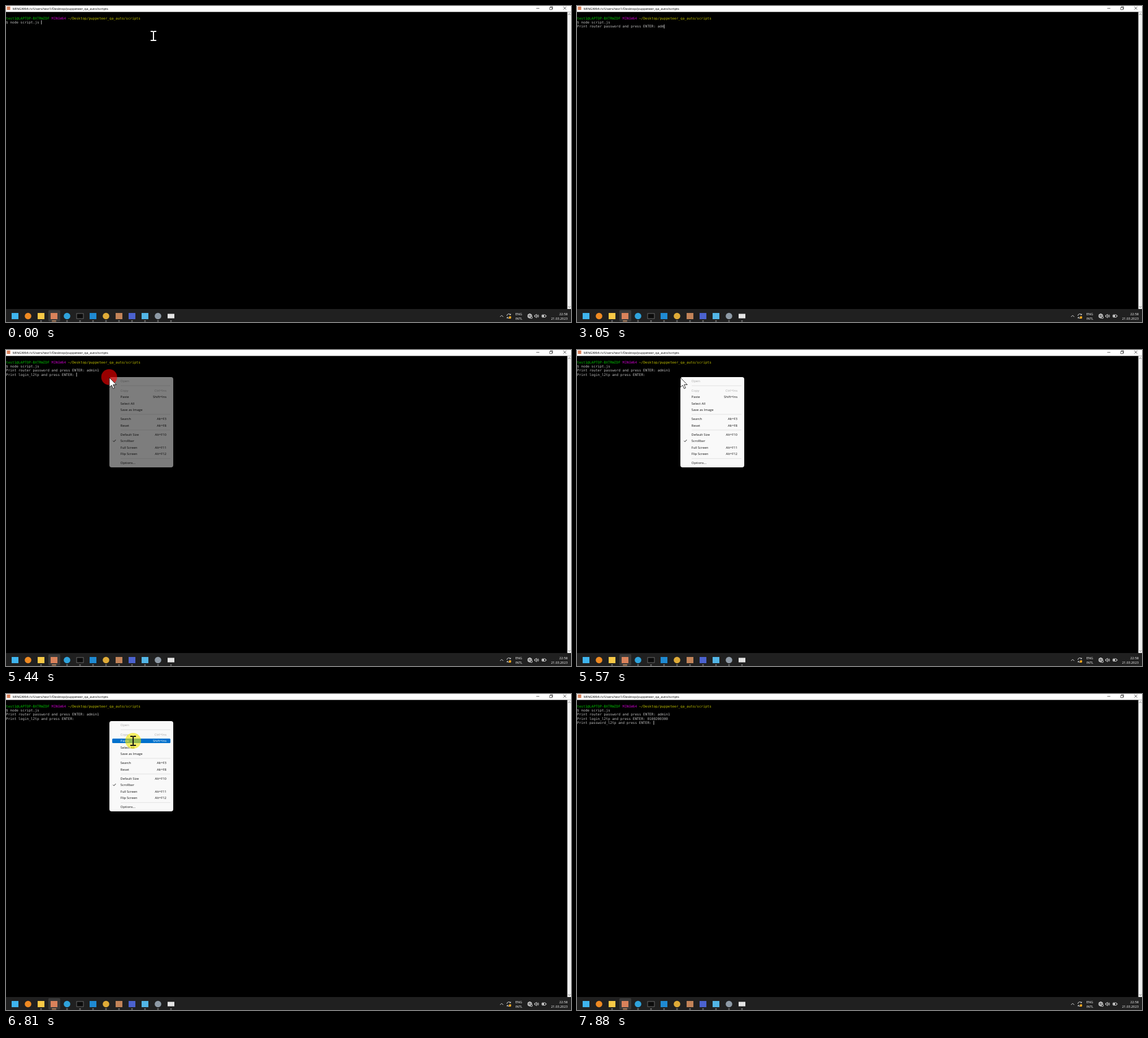
An HTML page for the animation above (8 s loop, 1000 px wide and 560 px high).

```html
<!DOCTYPE html>
<html lang="en">
<head>
<meta charset="utf-8">
<title>Terminal session</title>
<style>
  html, body { margin: 0; width: 100%; height: 100%; overflow: hidden; background: #000; }
  svg { display: block; width: 100vw; height: 100vh; }
  text { white-space: pre; }
  .ui { font: 5.92px "Open Sans", "Noto Sans", sans-serif; }
  .term { font: 6.08px "DejaVu Sans Mono", monospace; fill: #bfbfbf; }
  .end { text-anchor: end; }
  .line { fill: none; stroke: #fff; stroke-width: .8; }
</style>
</head>
<body>
<svg viewBox="0 0 1000 560">
  <rect width="1000" height="560"/>

  <g id="titlebar">
    <rect width="1000" height="10.5" fill="#fff"/>
    <rect x="1.5" y="1" width="6" height="6" fill="#d9825b"/>
    <text class="ui" x="11.7" y="6.9">MINGW64:/c/Users/test1/Desktop/puppeteer_qa_auto/scripts</text>
    <path d="M938.5 4.2h5.5M986.5 1.4l5 5m0-5l-5 5M962.3 2.6h4v4h-4zM963.5 2.4v-1h4v4h-1"
          fill="none" stroke="#222" stroke-width=".7"/>
  </g>

  <g id="scrollbar">
    <rect x="993.5" y="10.5" width="6.5" height="527" fill="#f0f0f0"/>
    <path d="M995 16l2-2.5 2 2.5M995 532l2 2.5 2-2.5" fill="none" stroke="#777" stroke-width=".8"/>
  </g>

  <g id="terminal" class="term">
    <text y="23.6" fill="#00bf00">test1@LAPTOP-BXTRWZDF <tspan fill="#bf00bf">MINGW64</tspan> <tspan fill="#bfbf00">~/Desktop/puppeteer_qa_auto/scripts</tspan></text>
    <text y="31">$ node script.js</text>
    <text y="38.3" id="router"></text>
    <text y="45.7" id="login"></text>
    <text y="53" id="password"></text>
    <rect id="caret" width="1" height="7.2"/>
  </g>

  <g id="taskbar">
    <rect y="537" width="1000" height="23" fill="#202020"/>
    <rect x="75" y="539" width="21" height="20" rx="2" fill="#393939"/>
    <g id="apps"></g>
    <path class="line" d="M874.5 551l2.8-2.8 2.8 2.8"/>
    <path class="line" d="M886.5 549a3.6 3.6 0 0 1 6.6-1.8v-1.8m0 1.8h-2M893.5 550a3.6 3.6 0 0 1-6.6 1.8v1.8m0-1.8h2"/>
    <circle cx="892" cy="552" r="2.2" fill="#f7a51c"/>
    <g class="ui" fill="#fff">
      <text x="901.5" y="548">ENG</text>
      <text x="901.5" y="556.4">INTL</text>
      <g class="end" style="font-size:5.75px">
        <text x="994" y="547.8">22:58</text>
        <text x="994" y="556.2">21.03.2023</text>
      </g>
    </g>
    <g class="line" stroke-width=".7">
      <circle cx="927" cy="549.3" r="3.7"/>
      <ellipse cx="927" cy="549.3" rx="1.6" ry="3.7"/>
      <path d="M923.5 548h7m-7 2.6h7"/>
      <circle cx="929.8" cy="552" r="1.8" fill="#202020"/>
      <path d="M935.5 548.2h1.4l2-2v6.4l-2-2h-1.4zM940.3 548q1 1.4 0 2.8M941.6 546.8q2 2.6 0 5.2"/>
      <rect x="948.5" y="547.2" width="6.5" height="4.4" rx="1"/>
      <path d="M956.2 548.5v1.8"/>
    </g>
    <rect x="949.4" y="548.1" width="2.6" height="2.6" fill="#fff"/>
  </g>

  <g id="menu" class="ui">
    <rect x="183" y="48" width="113" height="160" rx="4" fill="#f9f9f9"/>
    <path d="M203 63.3h88m-88 50.7h88m-88 27.8h88m-88 50.6h88" stroke="#d8d8d8" stroke-width=".7"/>
    <rect id="hover" x="188" width="103" height="8" rx="1.5" fill="#0070cc"/>
    <path d="M189.3 160.8l1.8 1.8 3.2-3.6" fill="none" stroke="#111" stroke-width=".9"/>
    <g id="items"></g>
  </g>

  <circle id="click" r="14"/>
  <path id="beam" fill="none" stroke-width="2"
        d="M-5-8h3.5L0-7l1.5-1H5M0-7V7M-5 8h3.5L0 7l1.5 1H5"/>
  <path id="arrow" fill="#fff" stroke="#000" stroke-width=".8"
        d="M0 0v17l4-3.6 2.6 6 2.6-1.1-2.6-5.8h5.6z"/>
</svg>

<script>
const LOOP = 8000, CELL = 3.66, ROW_TOP = 18, ROW = 7.35;
const $ = id => document.getElementById(id);

function add(parent, tag, attrs, text = '') {
  const el = document.createElementNS('http://www.w3.org/2000/svg', tag);
  for (const key in attrs) el.setAttribute(key, attrs[key]);
  el.textContent = text;
  $(parent).append(el);
  return el;
}
function set(id, attrs) {
  for (const key in attrs) $(id).setAttribute(key, attrs[key]);
}

// Taskbar: one plain shape per app, with a mark under those that run.
const apps = [
  ['square', '#3fb4ee'], ['circle', '#ef8a22'], ['square', '#f8c846'], ['square', '#d9825b'],
  ['circle', '#2fa3dc'], ['square', '#0c0c0c'], ['square', '#1f8ad2'], ['circle', '#dfab37'],
  ['square', '#c28358'], ['square', '#4b62cf'], ['square', '#52b5e6'], ['circle', '#8e9aa6'],
  ['square', '#e4e4e4']
];
apps.forEach(([shape, fill], i) => {
  const x = 16 + 23 * i, y = 549.5;
  if (shape === 'circle') add('apps', 'circle', { cx: x, cy: y, r: 5.8, fill });
  else {
    const h = i === 12 ? 8 : i === 5 ? 9 : 11;
    add('apps', 'rect', { x: x - 6, y: y - h / 2, width: 12, height: h, fill,
      stroke: i === 5 ? '#8a8a8a' : 'none', 'stroke-width': .7 });
  }
  if (i > 1) {
    const w = i === 3 ? 8 : 3;
    add('apps', 'rect', { x: x - w / 2, y: 557.6, width: w, height: 1.4, rx: .7,
      fill: i === 3 ? '#e0a070' : '#9a9a9a' });
  }
});

const items = [
  [55.3, 'Open', '', true], [71.5, 'Copy', 'Ctrl+Ins', true], [83, 'Paste', 'Shift+Ins'],
  [94.5, 'Select All', ''], [106, 'Save as Image', ''], [122, 'Search', 'Alt+F3'],
  [133.5, 'Reset', 'Alt+F8'], [149.7, 'Default Size', 'Alt+F10'], [161.2, 'Scrollbar', ''],
  [172.7, 'Full Screen', 'Alt+F11'], [184.2, 'Flip Screen', 'Alt+F12'], [200.3, 'Options...', '']
].map(([y, label, keys, disabled]) => ({
  y, disabled,
  parts: [
    add('items', 'text', { x: 202.6, y: y + 2.1 }, label),
    add('items', 'text', { x: 284, y: y + 2.1, class: 'end' }, keys)
  ]
}));

// Caret: time, row, column (no column while blinked off).
const caretTrack = [
  [0, 1, 17], [460, 2, 0], [1530], [1880, 2, 39], [2380],
  [2810, 2, 40], [2910, 2, 41], [3050, 2, 42], [3210, 2, 43], [3360, 2, 44], [3520, 2, 45],
  [3970, 3, 34], [4490], [5070, 3, 34], [5570], [6070, 3, 34], [6570],
  [6920, 3, 44], [7420], [7820, 4, 37]
];
const keyTimes = [2810, 2910, 3050, 3210, 3360, 3520];

// Index of the current step in a run of n steps from a to b; -1 before it.
const step = (t, a, b, n) =>
  t < a ? -1 : Math.min(n - 1, Math.floor((t - a) / (b - a) * (n - 1) + .1));
const part = (t, a, b, n) => Math.max(0, step(t, a, b, n)) / (n - 1);
const mix = (a, b, u) => a + (b - a) * u;
const between = (p, q, u) => [mix(p[0], q[0], u), mix(p[1], q[1], u)];
const easeOut = u => 1 - (1 - u) ** 1.6;

function pointerAt(t) {
  const corner = [183, 49], low = [219, 97], high = [227, 76], paste = [225, 83];
  if (t < 4490) return [261, 53];
  if (t < 5440) return between([256, 52], [183, 48.5], easeOut(part(t, 4490, 4870, 8)));
  if (t < 6430) {
    const u = part(t, 5730, 6180, 8);
    return u < .6 ? between(corner, low, u / .6) : between(low, high, (u - .6) / .4);
  }
  if (t < 6760) return between(high, paste, (step(t, 6430, 6600, 3) + 1) / 3);
  const k = step(t, 6760, 7160, 8);
  return between(paste, [260, 151], easeOut(Math.max(0, k - 1) / 6));
}

function pointerOpacity(t) {
  if (t < 4490) return 1 - (step(t, 460, 610, 3) + 1) / 3;
  return t < 7820 ? 1 : t < 7880 ? .4 : 0;
}

function drawTerminal(t) {
  const typed = 'admin1'.slice(0, keyTimes.filter(k => t >= k).length);
  $('router').textContent = t < 1880 ? '' : 'Print router password and press ENTER: ' + typed;
  $('login').textContent = t < 3970 ? '' :
    'Print login_l2tp and press ENTER: ' + (t < 6920 ? '' : '0100200300');
  $('password').textContent = t < 7820 ? '' : 'Print password_l2tp and press ENTER:';
  const [, row, col] = caretTrack.filter(c => t >= c[0]).pop();
  set('caret', col === undefined ? { opacity: 0 } :
    { opacity: 1, x: col * CELL, y: ROW_TOP + row * ROW });
}

function drawMenu(t, y) {
  const closing = step(t, 6760, 7160, 8);
  const opacity = closing < 0 ? part(t, 5320, 5570, 5) : [1, 1, .7, .35][closing] || 0;
  set('menu', { opacity });
  const active = t < 5730 ? null : t >= 6760 ? items[2] :
    items.find(i => !i.disabled && Math.abs(i.y - y) < 5.75);
  set('hover', active ? { opacity: 1, y: active.y - 4 } : { opacity: 0 });
  for (const item of items) {
    const fill = item === active ? '#fff' : item.disabled ? '#a8a8a8' : '#111';
    item.parts.forEach(el => el.setAttribute('fill', fill));
  }
}

function drawClick(t) {
  const right = step(t, 5320, 5570, 5), left = step(t, 6760, 7160, 8);
  if (left >= 0) set('click', { cx: 225, cy: 83, fill: '#f2e600', opacity: [.6, .6, .4, .2][left] || 0 });
  else set('click', { cx: 182.6, cy: 48, fill: '#f00', opacity: [.6, .6, .6, .25][right] || 0 });
}

function draw(t) {
  const [x, y] = pointerAt(t);
  const isArrow = t >= 5440 && t < 6760;
  const opacity = pointerOpacity(t);
  const transform = `translate(${x} ${y})`;
  drawTerminal(t);
  drawMenu(t, y);
  drawClick(t);
  set('arrow', { transform, opacity: isArrow ? opacity : 0 });
  set('beam', { transform, opacity: isArrow ? 0 : opacity,
    stroke: t >= 6760 && t < 6920 ? '#111' : '#fff' });
}

function frame() {
  draw(performance.now() % LOOP);
  requestAnimationFrame(frame);
}
frame();
</script>
</body>
</html>
```
